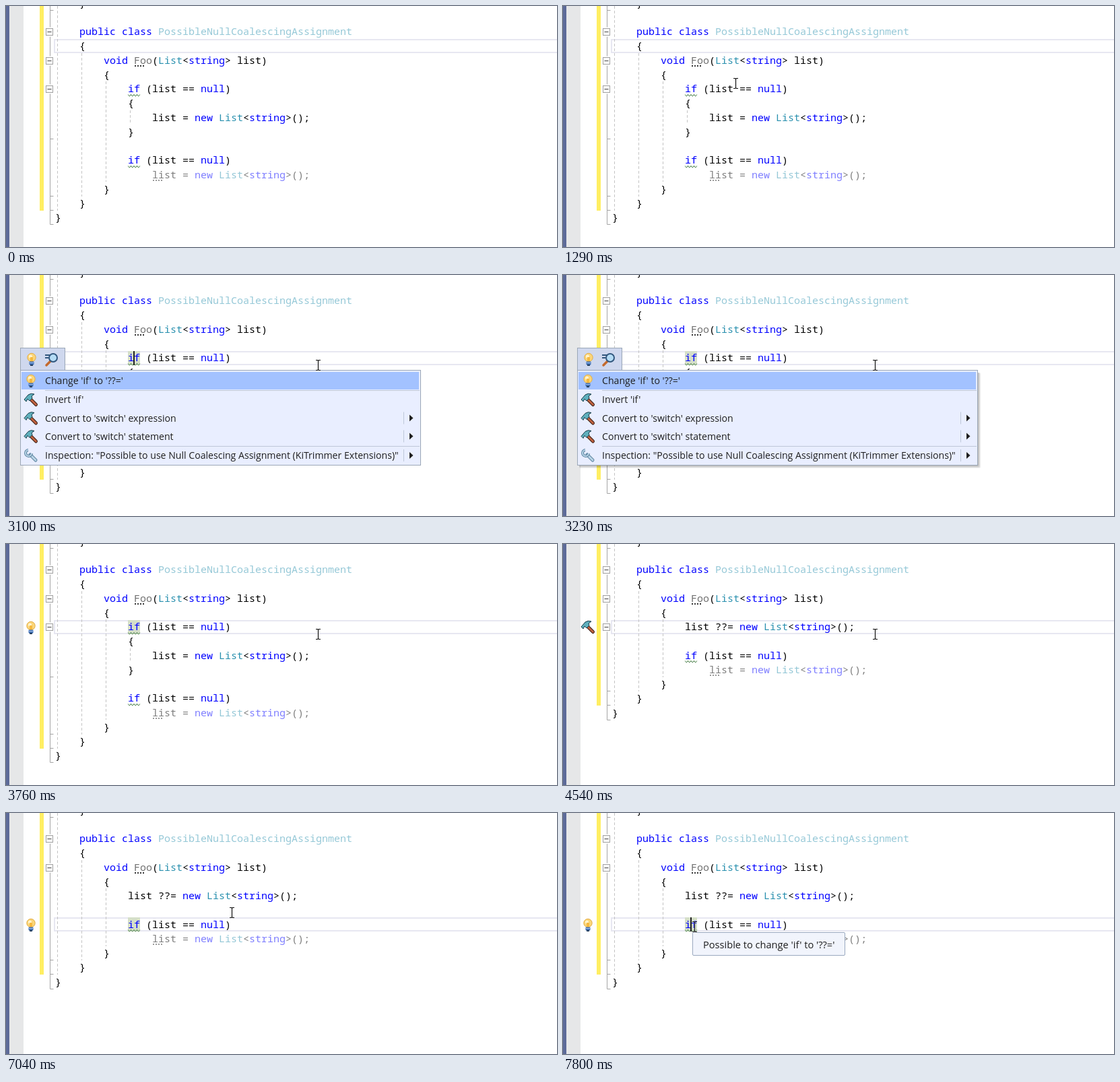
An HTML page that plays this animation: 818x358 px, repeating every 8 s.

```html
<!DOCTYPE html>
<html lang="en">
<head>
<meta charset="utf-8">
<title>Quick fix in a code editor</title>
<style>
  html, body { margin: 0; width: 100%; height: 100%; overflow: hidden; background: #fff; }
  svg { display: block; }
  text { white-space: pre; }
  .code { font: 15px "Noto Sans Mono", monospace; }
  .ui { font: 14.1px "Open Sans", "Noto Sans", sans-serif; fill: #1e1e1e; }
  .tip { font-size: 14.6px; }
  .kw { fill: #00f; }
  .type { fill: #2b91af; }
  .unused { fill: #95c8d7; }
  .method { fill: #707070; }
</style>
</head>
<body>
<svg id="stage" width="818" height="358" viewBox="0 0 818 358"></svg>
<script>
const LOOP = 8000, STEP = 70;
const stage = document.getElementById('stage');

const rowTop = row => Math.round(27.5 + 21.25 * row);
const colX = col => 73 + 9 * col;
const rect = (x, y, w, h, fill, more = '') =>
  `<rect x="${x}" y="${y}" width="${w}" height="${h}" fill="${fill}" ${more}/>`;
const path = (d, stroke, more = '') => `<path d="${d}" fill="none" stroke="${stroke}" ${more}/>`;
const at = (x, y, body) => `<g transform="translate(${x} ${y})">${body}</g>`;
const escapeText = s => s.replace(/&/g, '&amp;').replace(/</g, '&lt;');
const label = (x, y, s, cls = '') => `<text class="ui ${cls}" x="${x}" y="${y}">${escapeText(s)}</text>`;

// ---- code ----
const TOKENS = /(\b(?:public|class|void|if|null|new|string|List|Foo|Possible\w+)\b)/;
const tokenClass = w =>
  w === 'List' ? 'type' : w === 'Foo' ? 'method' : w.startsWith('Possible') ? 'unused' : 'kw';

function line(row, col, s, opacity = 1, plainNew = false) {
  const body = s.split(TOKENS).map((part, i) =>
    i % 2 && !(plainNew && part === 'new')
      ? `<tspan class="${tokenClass(part)}">${part}</tspan>` : escapeText(part)).join('');
  return `<text class="code" x="${colX(col)}" y="${Math.round(43 + 21.25 * row)}" opacity="${opacity}">${body}</text>`;
}

const squiggle = row =>
  path(`M181 ${rowTop(row) + 18.5}` + 'l2.25 2.5 2.25 -2.5'.repeat(4), '#6f9a6f', 'stroke-width="1.1"');
const dots = (x, row, color) =>
  path(`M${x} ${rowTop(row) + 19}h14`, color, 'stroke-width="2" stroke-dasharray="2 2"');

function codeText(fixed, t) {
  const fresh = t < 4280;
  const last = fixed ? 10 : 13, check = fixed ? 6 : 9;
  let s = line(-2, 4, '}') +
    line(0, 4, 'public class PossibleNullCoalescingAssignment') + line(1, 4, '{') +
    line(2, 8, 'void Foo(List<string> list)') + dots(191, 2, '#333') + line(3, 8, '{');
  if (fixed) {
    s += line(4, 12, 'list ??= new List<string>();', 1, fresh);
  } else {
    s += line(4, 12, 'if (list == null)') + squiggle(4) + line(5, 12, '{') +
      line(6, 16, 'list = new List<string>();') + line(7, 12, '}');
  }
  s += line(check, 12, 'if (list == null)') +
    line(check + 1, 16, 'list = new List<string>();', .5) + dots(218, check + 1, '#999');
  if (!fixed || !fresh) s += squiggle(check);
  return s + line(last - 2, 8, '}') + line(last - 1, 4, '}') + line(last, 0, '}');
}

// ---- margins, outline and indent guides ----
function margins(fixed, t) {
  const last = fixed ? 10 : 13;
  const bottom = row => Math.round(48 + 21.25 * row) + .5;
  const guide = (x, y1, y2) => path(`M${x} ${y1}V${y2}`, '#c4c4c4', 'stroke-dasharray="4 3"');
  let s = rect(0, 0, 5, 358, '#5d6b99') + rect(5, 0, 21, 358, '#e6e7e8') +
    rect(50, 0, 6, rowTop(last), '#ffee62') +
    guide(76.5, 0, rowTop(last)) + guide(112.5, 70, rowTop(last - 1)) + guide(148.5, 112, rowTop(last - 2));
  if (!fixed) s += guide(184.5, 155, 176);

  const ends = fixed ? [8, 9, 10] : [7, 11, 12, 13];
  s += path(`M65.5 0V${bottom(last)}M65.5 6.5h5` + ends.map(r => `M65.5 ${bottom(r)}h5`).join(''), '#a5a5a5');
  for (const row of t < 5270 ? [0, 2, 4] : [0, 2]) {
    const y = Math.round(38 + 21.25 * row) + .5;
    s += rect(57, y - 7, 13, 14, '#fff') +
      rect(59.5, y - 5, 10, 10, '#fff', 'stroke="#a0a0a0"') + path(`M61.5 ${y}h6`, '#444');
  }
  return s;
}

const currentLine = row =>
  rect(72, rowTop(row) + 1, 760, 19, '#fff', 'stroke="#e7e7f1" stroke-width="2"');
const mark = (row, col, n, color) => rect(colX(col), rowTop(row), 9 * n, 21, color);

// ---- icons, centred on the origin ----
const bulb =
  '<circle cy="-2.5" r="6.2" fill="#fbd67a" stroke="#e3ad45"/>' +
  '<circle cx="-1.5" cy="-4" r="2.5" fill="#fff3cd"/>' +
  rect(-2, -3, 4, 6, '#f6b93f') + rect(-3.5, 3.5, 7, 5, '#3f6fb5', 'rx="1"') +
  path('M-3 5.5h6', '#a9c4e8') + rect(-2, 8, 4, 2, '#27405f');
const hammer =
  path('M-1 -1L7.5 7.5', '#3a1d14', 'stroke-width="5" stroke-linecap="round"') +
  path('M-1 -1L7.5 7.5', '#c0623f', 'stroke-width="3" stroke-linecap="round"') +
  '<path d="M-10 0L-4 -7Q0 -10 5 -8L1 -5L2 -2L-2 2L-5 -1L-7 3Z" fill="#5fb0bd" stroke="#173a48"/>';
const wrench =
  path('M-1 -1L7 7', '#5d84a0', 'stroke-width="5" stroke-linecap="round"') +
  path('M-1 -1L7 7', '#b9d5e6', 'stroke-width="3" stroke-linecap="round"') +
  path('M-4 -8A4.5 4.5 0 1 0 1 -3', '#5d84a0', 'stroke-width="4"') +
  path('M-4 -8A4.5 4.5 0 1 0 1 -3', '#b9d5e6', 'stroke-width="2"');
const magnifier =
  path('M-1 3L-7 9', '#c46a2e', 'stroke-width="3.5" stroke-linecap="round"') +
  '<circle cx="3" cy="-2" r="6" fill="#b5dcf5" stroke="#31577d" stroke-width="2"/>' +
  path('M-9 -6h7M-9 -2h5', '#31577d', 'stroke-width="2"');

// ---- pop-ups ----
const MENU = [
  [157, bulb, "Change 'if' to '??='"],
  [185, hammer, "Invert 'if'"],
  [212.5, hammer, "Convert to 'switch' expression", true],
  [239.5, hammer, "Convert to 'switch' statement", true],
  [268, wrench, 'Inspection: "Possible to use Null Coalescing Assignment (KiTrimmer Extensions)"', true]
];

function menu(shadow) {
  const edge = 'stroke="#9ba7b7"';
  let s = '';
  if (shadow) for (let i = 4; i > 0; i--) s += rect(24, 145, 592 + i, 138 + i, '#000', 'opacity=".07" rx="2"');
  s += rect(21.5, 108.5, 66, 34, '#cfd8ee', edge) + at(38, 125, bulb) + at(67, 125, magnifier) +
    rect(21.5, 141.5, 594, 141, '#e9eeff', edge) + rect(23, 144, 590, 26, '#a3c2ff') +
    path('M58 171.5H614M58 254.5H614', '#bec7d8');
  for (const [y, icon, name, more] of MENU) {
    s += at(37, y, icon) + label(58, Math.round(y + 5), name);
    if (more) s += path(`M590.5 ${y - 9}v18`, '#bec7d8') +
      `<path d="M599 ${y - 5}l5.5 5l-5.5 5z" fill="#1e1e1e"/>`;
  }
  return s;
}

const tooltip = (x, y) =>
  rect(x + .5, y + .5, 226, 34, '#f1f4fc', 'stroke="#9aa9bf" rx="1.5"') +
  label(x + 16, y + 24, "Possible to change 'if' to '??='", 'tip');

// ---- pointer ----
const TRACK = [
  [200, 706, 238], [270, 690, 219], [340, 667, 197], [600, 667, 197],
  [1000, 420, 130], [1220, 260, 114], [1400, 193, 133], [2020, 193, 133],
  [2300, 463, 134], [5200, 463, 134], [5600, 350, 146], [6030, 191, 164], [6830, 191, 164],
  [6970, 270, 154], [7040, 335, 148], [7180, 360, 144], [7450, 270, 171],
  [7660, 191, 162], [7730, 195, 169], [LOOP, 195, 169]
];

function pointer(t) {
  if (t < 200) return '';
  const base = [6830, 5200, 2020, 600, 200].find(b => t >= b);
  const q = base + Math.floor((t - base) / STEP) * STEP;
  const i = Math.max(1, TRACK.findIndex(p => p[0] > q));
  const [t0, x0, y0] = TRACK[i - 1], [t1, x1, y1] = TRACK[i];
  const k = (q - t0) / (t1 - t0);
  const x = Math.round(x0 + (x1 - x0) * k) + .5, y = Math.round(y0 + (y1 - y0) * k);
  const d = `M${x - 3.5} ${y - 7.5}h2.5l1 1l1 -1h2.5M${x} ${y - 7}V${y + 7}M${x - 3.5} ${y + 7.5}h2.5l1 -1l1 1h2.5`;
  return path(d, '#fff', 'stroke-width="2.4" opacity=".6"') + path(d, '#111', 'stroke-width="1.2"');
}

function scene(t) {
  const within = (a, b) => t >= a && t < b;
  const any = spans => spans.some(([a, b]) => within(a, b));
  const fixed = t >= 4020;
  const row = t < 1750 ? 1 : t < 6500 ? 4 : 6;
  let s = currentLine(row) + margins(fixed, t);

  if (within(1820, 4020)) s += mark(4, 12, 2, '#d5dfc9');
  if (t >= 6570) s += mark(6, 12, 2, '#d5dfc9');
  if (within(5270, 6570)) {
    const soft = '#e2e6d6';
    s += rect(342.5, 69.5, 36, 21, soft, 'stroke="#a0a0a0"') +
      mark(4, 12, 4, soft) + mark(6, 16, 4, soft) + mark(7, 16, 4, soft);
  }
  s += codeText(fixed, t);

  if (any([[1750, 2300], [2700, 3230], [6500, 7030], [7560, LOOP]])) s += rect(189, rowTop(row), 2, 21, '#222');
  if (any([[4870, 5400], [5930, 6230]])) s += rect(180, rowTop(row), 2, 21, '#222');

  if (within(2090, 4020)) s += at(37, 124, bulb);
  if (within(4280, 6700)) s += at(37, 123, hammer);
  if (t >= 6700) s += at(37, 166, bulb);

  if (within(3100, 3760)) s += menu(t >= 3230);
  if (within(1680, 1820)) s += tooltip(192, 135);
  if (within(6300, 6500)) s += tooltip(190, 177);
  if (t >= 7730) s += tooltip(192, 177);
  return s + pointer(t);
}

let shown = '';
function tick() {
  const next = scene(performance.now() % LOOP);
  if (next !== shown) stage.innerHTML = shown = next;
  requestAnimationFrame(tick);
}
tick();
</script>
</body>
</html>
```
